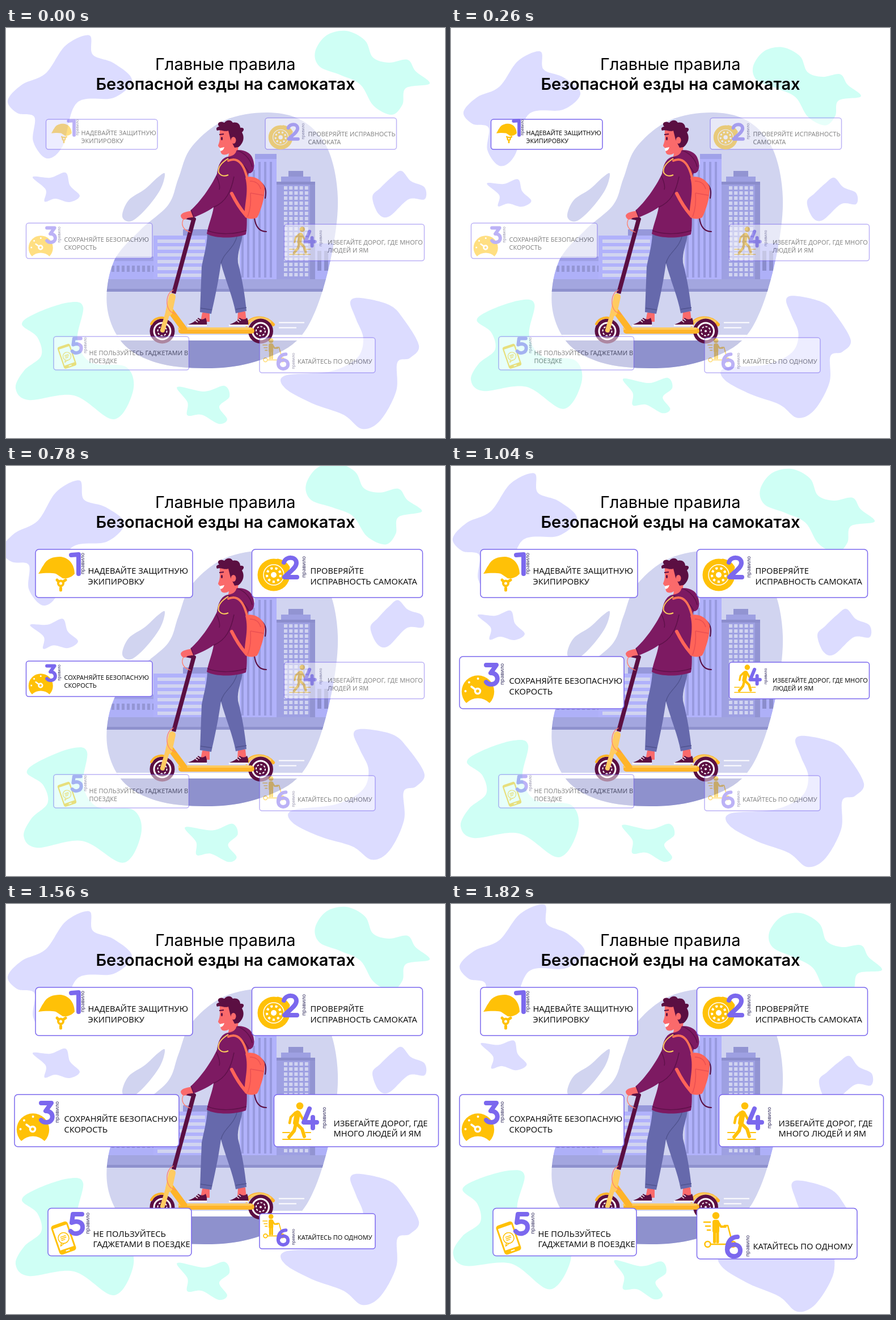
These frames come from a looping animation (774 px wide and 723 px high, 2.08 s). An HTML page:

```html
<!DOCTYPE html>
<html lang="ru">
<head>
<meta charset="utf-8">
<title>Правила езды на самокатах</title>
<style>
html, body { margin: 0; width: 100%; height: 100%; overflow: hidden; background: #fff }
svg { display: block; width: 774px; height: 723px }
.title { font: 29px Inter, sans-serif; text-anchor: middle }
.bold { font-weight: 600 }
.card text { font-family: "Noto Sans", "Open Sans", sans-serif; fill: #111 }
.card .label { text-anchor: middle; fill: #2f2a5c }
.box { fill: #fff; stroke: #7b68ee; stroke-width: 1.5 }
.digit { fill: none; stroke: #7b68ee; stroke-width: 8; stroke-linecap: round; stroke-linejoin: round }
.icon { fill: #ffc107 }
.line { fill: none; stroke: #ffc107; stroke-linecap: round; stroke-linejoin: round }
.white { fill: none; stroke: #fff }
</style>
</head>
<body>
<svg viewBox="0 0 774 723">
  <defs>
    <clipPath id="clip"><path id="hill"/></clipPath>
    <pattern id="grid" x="490" y="279" width="9.2" height="9" patternUnits="userSpaceOnUse"><path fill="#d1d4f0" d="M0 0H6V6H0Z"/></pattern>
    <pattern id="panes" x="186" y="419" width="9" height="40" patternUnits="userSpaceOnUse"><path fill="#9496d4" d="M0 0H5V11H0Z"/></pattern>
    <pattern id="floors" y="373" width="9" height="12" patternUnits="userSpaceOnUse"><path fill="#d1d4f0" d="M0 0H9V6H0Z"/></pattern>
    <pattern id="columns" x="415" width="10" height="9" patternUnits="userSpaceOnUse"><path fill="#989ade" d="M0 0H4V9H0Z"/></pattern>
    <g id="wheel">
      <circle r="22" fill="#5b0f42"/>
      <circle r="14.5" fill="none" stroke="#fff" stroke-width="3"/>
      <circle r="8" fill="none" stroke="#fff" stroke-width="2" stroke-dasharray="2 4.3"/>
      <circle r="2" fill="#fff"/>
    </g>
    <g id="shoe">
      <path d="M0 12C8 9 13 6 18 0C23 4 28 3 31 0Q34 7 33 13H0Z" fill="#5b0f42"/>
      <path d="M-1 12H33V15H-1Z" fill="#fff"/>
      <path d="M13 5L17 8M16 2L20 5" stroke="#fff" stroke-width="1.5"/>
    </g>
  </defs>

  <g id="blobs"></g>

  <!-- skyline -->
  <path id="leaf" fill="#d1d4f0"/>
  <g clip-path="url(#clip)">
    <path fill="#d1d4f0" d="M170 140H590V610H170Z"/>
    <path fill="#aeb0f8" d="M180 403H265V444H180ZM545 380H590V444H545Z"/>
    <path fill="#9fa1e6" d="M180 403H265V411H180Z"/>
    <path fill="url(#panes)" d="M186 419H260V430H186Z"/>
    <path fill="#9698da" d="M312 355H357V367H312Z"/>
    <path fill="#b1b2fb" d="M260 366H357V444H260ZM412 241H439V222H477V444H412Z"/>
    <path fill="url(#floors)" d="M267 373H351V439H267Z"/>
    <path fill="#a0a2e9" d="M439 222H477V231H439Z"/>
    <path fill="url(#columns)" d="M415 250H439V236H473V440H415Z"/>
    <path fill="#9294d2" d="M498 252H524V262H498ZM535 271H545V444H535Z"/>
    <path fill="#9ea0e2" d="M485 262H537V271H485ZM477 271H536V444H477Z"/>
    <path fill="#8b8dcc" d="M477 271H545V276H477ZM549 393H556V428H549ZM561 393H568V428H561Z"/>
    <path fill="url(#grid)" d="M490 279H535V440H490Z"/>
    <path fill="#a3a6df" d="M170 443H590V465H170Z"/>
    <path fill="#8e91cd" d="M170 460H590V465H170ZM170 551H590V610H170Z"/>
    <path fill="#fff" d="M170 541H590V551H170Z"/>
  </g>
  <path stroke="#fff" stroke-width="2" d="M481 519.5H526M481 528.5H512"/>

  <!-- scooter -->
  <g fill="none" stroke-linecap="round">
    <path stroke="#ffb429" stroke-width="6" d="M424 524C432 509 456 506 471 523"/>
    <path stroke="#ffcb61" stroke-width="4" d="M429 518C440 509 456 510 466 518"/>
    <use href="#wheel" x="275.500" y="534.500"/>
    <use href="#wheel" x="449" y="534.500"/>
    <path stroke="#ffb429" stroke-width="10" d="M309 534H433"/>
    <path stroke="#ffcb61" stroke-width="4" d="M305 530H432"/>
    <path stroke="#ffb429" stroke-width="11" d="M291 500L314 531"/>
    <path stroke="#ffcb61" stroke-width="12" d="M293 474L287 502"/>
    <path stroke="#ffcb61" stroke-width="8" d="M286 499L276 533"/>
    <path stroke="#ffb429" stroke-width="4" d="M256 522C260 514 268 510 277 511"/>
    <path stroke="#5b0f42" stroke-width="7.500" stroke-linecap="butt" d="M331 337L295.500 468"/>
    <path stroke="#5b0f42" stroke-width="6" d="M317 334L332 337"/>
    <path stroke="#ff806f" stroke-width="1.300" d="M314 335C307 346 312 356 325 360M295 462C281 469 281 490 290 500L300 505"/>
  </g>

  <!-- rider -->
  <path fill="#fa6a6b" d="M346 502H359V518H343ZM409 500H422L424 518H408Z"/>
  <use href="#shoe" x="321" y="511"/>
  <use href="#shoe" x="394" y="511"/>
  <path fill="#6669ac" d="M355 363H417C416 380 407 395 409 414C417 445 421 470 424 499L405 503C400 474 387 445 379 415C374 450 368 477 362 504L342 501C343 474 344 447 345 421C349 399 354 386 355 363Z"/>
  <path fill="none" stroke="#50538f" stroke-width="1.300" d="M343 494L363 497M405 496L424 493M408 365C402 390 384 395 379 415"/>
  <path fill="#fa6a6b" d="M377 180C376 190 379 196 374 207C374 210 377 210 377 212L379 220C382 226 390 223 393 221L391 231L407 235L410 205L401 181Z"/>
  <path fill="#fff" d="M376.500 212L385 210Q383 217 378 217Z"/>
  <ellipse cx="380.500" cy="195" rx="1.600" ry="3" fill="#5b0f42"/>
  <path stroke="#5b0f42" stroke-width="2" d="M376 188L384 187"/>
  <path fill="#5b0f42" d="M372 181C369 176 373 174 376 174C370 167 378 163 385 167C390 161 397 162 400 167C409 165 413 171 413 176C420 175 421 180 416 184C421 192 419 203 410 210L403 211L396 197L392 181C386 184 378 178 372 181Z"/>
  <ellipse cx="401" cy="198" rx="4.500" ry="6" fill="#fa6a6b"/>
  <path fill="#fa6a6b" d="M331 322C321 323 309 325 308 331C309 338 316 340 320 335L334 333Z"/>
  <path fill="#7d1a62" d="M391 227C379 229 374 243 372 257C361 281 341 308 326 321L331 334C346 328 358 322 366 316C364 331 357 346 354 363C370 372 405 371 423 364C427 345 422 320 427 290C430 275 424 262 428 256C438 257 440 241 434 228C430 218 415 213 406 216C406 222 399 226 391 227Z"/>
  <path fill="none" stroke="#5f114a" stroke-width="1.500" d="M355 357C374 365 403 364 424 357M402 262C397 288 388 307 366 316M371 261C376 272 378 279 376 285M326 321L331 334M392 229C410 231 422 243 428 255M408 216C420 220 431 231 434 245"/>
  <path fill="none" stroke="#ffcf5c" stroke-width="2" d="M392 230C379 238 373 247 375 255Q381 264 392 259"/>
  <g fill="none" stroke-linecap="round">
    <path stroke="#ff7256" stroke-width="4" d="M392 234C411 226 420 244 425 264"/>
    <path stroke="#ff6459" stroke-width="6" d="M398 292C405 306 413 319 422 329"/>
    <path stroke="#5b0f42" stroke-width="2" d="M438 335C440 350 447 359 459 359M450 273C459 281 459 290 457 300"/>
  </g>
  <path fill="#ff6459" d="M422 264C436 258 452 268 456 281C457 300 448 325 443 334C435 338 425 337 421 333C419 315 429 290 422 264Z"/>
  <path fill="none" stroke="#e94f52" stroke-width="1.500" d="M430 270C441 270 447 276 449 284M431 291L454 295M431 291Q433 314 426 333"/>

  <text class="title" x="386.700" y="74">Главные правила</text>
  <text class="title bold" x="387" y="109">Безопасной езды на самокатах</text>
  <g id="cards"></g>
</svg>

<script>
const STEP = 260, STEPS = 8, SMALL = .75;
const $ = id => document.getElementById(id);

// Closed smooth curve through key points, written as "x,y x,y ...".
function smooth(text) {
  const pts = text.split(' ').map(p => p.split(',').map(Number));
  const at = i => pts[(i + pts.length) % pts.length];
  const handle = (i, dir) => at(i).map((v, k) => v + dir * (at(i + 1)[k] - at(i - 1)[k]) / 6);
  return `M${at(0)}` + pts.map((_, i) => `C${handle(i, 1)} ${handle(i + 1, -1)} ${at(i + 1)}`).join('') + 'Z';
}

const LILAC = '#dcdcff', MINT = '#cffff5';
const blobs = [
  [LILAC, '3,128 28,100 70,80 105,31 147,13 153,47 190,62 222,92 190,123 125,132 100,208 72,230 48,200 50,157 20,150'],
  [MINT, '545,42 565,13 600,5 633,22 647,52 675,61 708,56 722,76 747,98 705,106 699,135 680,153 648,137 625,100 590,83 553,68'],
  [LILAC, '47,263 78,264 105,255 113,278 130,296 112,307 87,301 68,306 70,285'],
  [LILAC, '680,263 697,252 714,270 738,281 738,302 710,302 676,332 657,328 646,298 660,282'],
  [MINT, '28,522 55,502 110,484 136,492 126,550 150,590 212,598 224,640 190,690 120,648 40,656 17,635 32,604 62,578 55,545'],
  [MINT, '302,633 350,641 385,631 394,650 376,668 390,690 375,698 345,682 320,683 320,660'],
  [LILAC, '607,483 625,476 675,488 700,512 728,560 712,582 690,590 688,640 660,692 628,707 595,682 540,662 492,635 492,613 570,606 618,583 630,548 617,513']
];
$('blobs').innerHTML = blobs.map(([fill, pts]) => `<path fill="${fill}" d="${smooth(pts)}"/>`).join('');
$('hill').setAttribute('d', smooth('462,149 525,165 568,215 585,300 574,400 545,500 505,558 430,591 350,600 265,590 205,555 178,490 190,412 237,356 286,312 304,265 327,210 385,163'));
$('leaf').setAttribute('d', smooth('280,257 272,285 246,320 220,341 205,332 216,304 245,284 268,263'));

const turn = angle => `rotate(${angle} 387 361)`;
const sway = ['', 'translate(19.1 29.3) scale(.942 .931)', '', turn(-2.9)];

// Icons use the stage coordinates of the large cards. num is the digit's corner,
// label the side label's distance from it, text the start of the first line.
const cards = [
  {
    num: [111, 152], label: 25, shrink: .75, digit: 'M4 5L17 4V38',
    icon: `<path class="icon" d="M57 190C61 185 62 180 66 175C72 163 84 160 95 160C112 161 121 175 121 190C116 196 108 199 100 198L88 190C78 188 66 189 57 190Z"/>
      <path class="line" stroke-width="5" d="M90 201L92 203M105 201L102 203M96.500 215V219"/>
      <circle class="line" stroke-width="4" cx="96.500" cy="207" r="4.500"/>`,
    big: { box: [52, 147, 277, 85], text: [144.5, 190.3], lines: ['НАДЕВАЙТЕ ЗАЩИТНУЮ', 'ЭКИПИРОВКУ'] },
    small: { box: [70.5, 161, 196.5, 53], text: [132.5, 189], lines: ['НАДЕВАЙТЕ ЗАЩИТНУЮ', 'ЭКИПИРОВКУ'] }
  },
  {
    num: [486, 158], label: 40, digit: 'M4 12C7 1 26 1 26 13C26 22 12 30 5 38H27',
    icon: `<path class="line" stroke-width="9" d="M479 168Q490 170 496 179"/>
      <circle class="icon" cx="472" cy="192" r="28.500"/>
      <circle class="white" stroke-width="1.500" cx="472" cy="192" r="18"/>
      <circle class="white" stroke-width="4" stroke-dasharray="4 4.400" cx="472" cy="192" r="12"/>
      <circle cx="472" cy="192" r="5" fill="#fff"/>`,
    big: { box: [433.5, 147, 301, 85], text: [536.5, 190.3], lines: ['ПРОВЕРЯЙТЕ', 'ИСПРАВНОСТЬ САМОКАТА'] },
    small: { box: [457, 158.5, 231.5, 55.5], text: [532.5, 191.5], lines: ['ПРОВЕРЯЙТЕ ИСПРАВНОСТЬ', 'САМОКАТА'] }
  },
  {
    num: [58, 347], label: 33, digit: 'M4 4H22L12 18C27 17 28 38 13 38Q7 38 4 34',
    icon: `<path class="icon" d="M27 418A28.700 28.700 0 1 1 68 418A29 29 0 0 0 27 418Z"/>
      <path class="white" stroke-width="4" stroke-linecap="round" stroke-dasharray="0 17.200" d="M25.500 397A22 22 0 0 1 69.500 397"/>
      <path class="white" stroke-width="3.500" stroke-linecap="round" d="M44 395L36 389"/>
      <circle class="icon" stroke="#fff" stroke-width="3.500" cx="47" cy="397" r="4.500"/>`,
    big: { box: [15, 336, 290, 92], text: [102.5, 384.3], lines: ['СОХРАНЯЙТЕ БЕЗОПАСНУЮ', 'СКОРОСТЬ'] },
    small: { box: [35.5, 344, 222.5, 62.5], text: [102.5, 377.5], lines: ['СОХРАНЯЙТЕ БЕЗОПАСНУЮ', 'СКОРОСТЬ'] }
  },
  {
    num: [521, 357], label: 41, digit: 'M14 4L4 28H27M20 19V38',
    icon: `<circle class="icon" cx="518" cy="356" r="6.300"/>
      <path class="line" stroke-width="10" d="M514 369L511 386"/>
      <path class="line" stroke-width="4.500" d="M510 368L502 376L500 386M517 368L523 379L531 383"/>
      <path class="line" stroke-width="6" d="M511 388L508 400L499 411M513 388L522 397L526 410"/>
      <path class="line" stroke-width="2" d="M488 403H500M528 403H537M488 415H537"/>`,
    big: { box: [472.5, 336, 290, 92], text: [577.5, 392], lines: ['ИЗБЕГАЙТЕ ДОРОГ, ГДЕ', 'МНОГО ЛЮДЕЙ И ЯМ'] },
    small: { box: [490.5, 346, 247, 64.5], text: [567, 382], lines: ['ИЗБЕГАЙТЕ ДОРОГ, ГДЕ МНОГО', 'ЛЮДЕЙ И ЯМ'] }
  },
  {
    num: [110, 543], label: 35, digit: 'M24 4H8L6 19C14 15 26 17 25 28C24 39 10 41 4 34',
    icon: `<g transform="rotate(-19 101.500 589)">
      <rect class="icon" x="86" y="562" width="31" height="54" rx="5"/>
      <path fill="#fff" d="M89 568H114V608H89Z"/>
      <circle class="line" stroke-width="1.600" cx="101.500" cy="589" r="9.500"/>
      <path class="line" stroke-width="1.500" d="M97 586H106M97 589H106M97 592H103M95 596L92 601L100 598"/>
      <path class="white" stroke-width="2" d="M98 612H105"/></g>`,
    big: { box: [74, 536.5, 253, 84], text: [153.5, 586.5], lines: ['НЕ ПОЛЬЗУЙТЕСЬ', 'ГАДЖЕТАМИ В ПОЕЗДКЕ'] },
    small: { box: [84, 544, 238.5, 59], text: [146.5, 577], lines: ['НЕ ПОЛЬЗУЙТЕСЬ ГАДЖЕТАМИ В', 'ПОЕЗДКЕ'] }
  },
  {
    num: [483, 583], label: 41, shrink: .9, digit: 'M22 4C10 4 4 14 4 26C4 42 27 42 27 28C27 15 9 14 4 26',
    icon: `<circle class="icon" cx="467" cy="549.500" r="6.300"/>
      <rect class="icon" x="461" y="557" width="12" height="23" rx="4"/>
      <path class="line" stroke-width="4" d="M471 561L476 569L484 569"/>
      <path class="line" stroke-width="5" d="M464.500 578V596M470 578V596"/>
      <path class="line" stroke-width="2.500" d="M482 567H488L496 597M458 600H489L493 591M446 561H457M449 568H457M452 575H457"/>
      <circle class="line" stroke-width="2.500" cx="452.500" cy="600" r="5"/>
      <circle class="line" stroke-width="2.500" cx="497" cy="600" r="5"/>`,
    big: { box: [433.5, 536.5, 282.5, 89.5], text: [532.5, 609.3], lines: ['КАТАЙТЕСЬ ПО ОДНОМУ'] },
    small: { box: [447, 546, 204, 62], text: [514, 592], lines: ['КАТАЙТЕСЬ ПО ОДНОМУ'] }
  }
];

// A small card is the large layout scaled about the start of its text.
function drawCard({ num, label, shrink = 1, digit, icon, big }, { box, text, lines }, scale) {
  const [x, y] = big.text, [w, h] = box.slice(2);
  const cx = num[0] + 15, cy = num[1] + 21;
  const k = scale < 1 ? shrink : 1;
  const rows = lines.map((line, i) => `<text x="${x}" y="${y + i * 18.4}" font-size="14.65">${line}</text>`);
  return `<g class="card">
    <rect class="box" x="${box[0]}" y="${box[1]}" width="${w}" height="${h}" rx="${6 * scale}"/>
    <g transform="translate(${text}) scale(${scale}) translate(${-x} ${-y})">
      <g transform="translate(${cx} ${cy}) scale(${k}) translate(${-cx} ${-cy})">${icon}</g>
      <path class="digit" transform="translate(${num})" d="${digit}"/>
      <text class="label" font-size="9.1" transform="translate(${num[0] + label + 2.3} ${num[1] + 20}) rotate(-90)">правило</text>
      ${rows.join('')}
    </g></g>`;
}
$('cards').innerHTML = cards.map(c => drawCard(c, c.small, SMALL) + drawCard(c, c.big, 1)).join('');
const nodes = [...$('cards').children];

function show(time) {
  const step = Math.floor(time / STEP) % STEPS;
  $('blobs').setAttribute('transform', step === 7 ? turn(2.9) : sway[step % 4]);
  // Card i turns solid on step i + 1 and grows on the next one.
  cards.forEach((_, i) => {
    const [small, big] = nodes.slice(2 * i);
    const grown = step > i + 1;
    small.style.display = grown ? 'none' : '';
    small.style.opacity = step > i ? 1 : .5;
    big.style.display = grown ? '' : 'none';
  });
}

const start = performance.now();
function tick() {
  show(performance.now() - start);
  requestAnimationFrame(tick);
}
tick();
</script>
</body>
</html>
```
